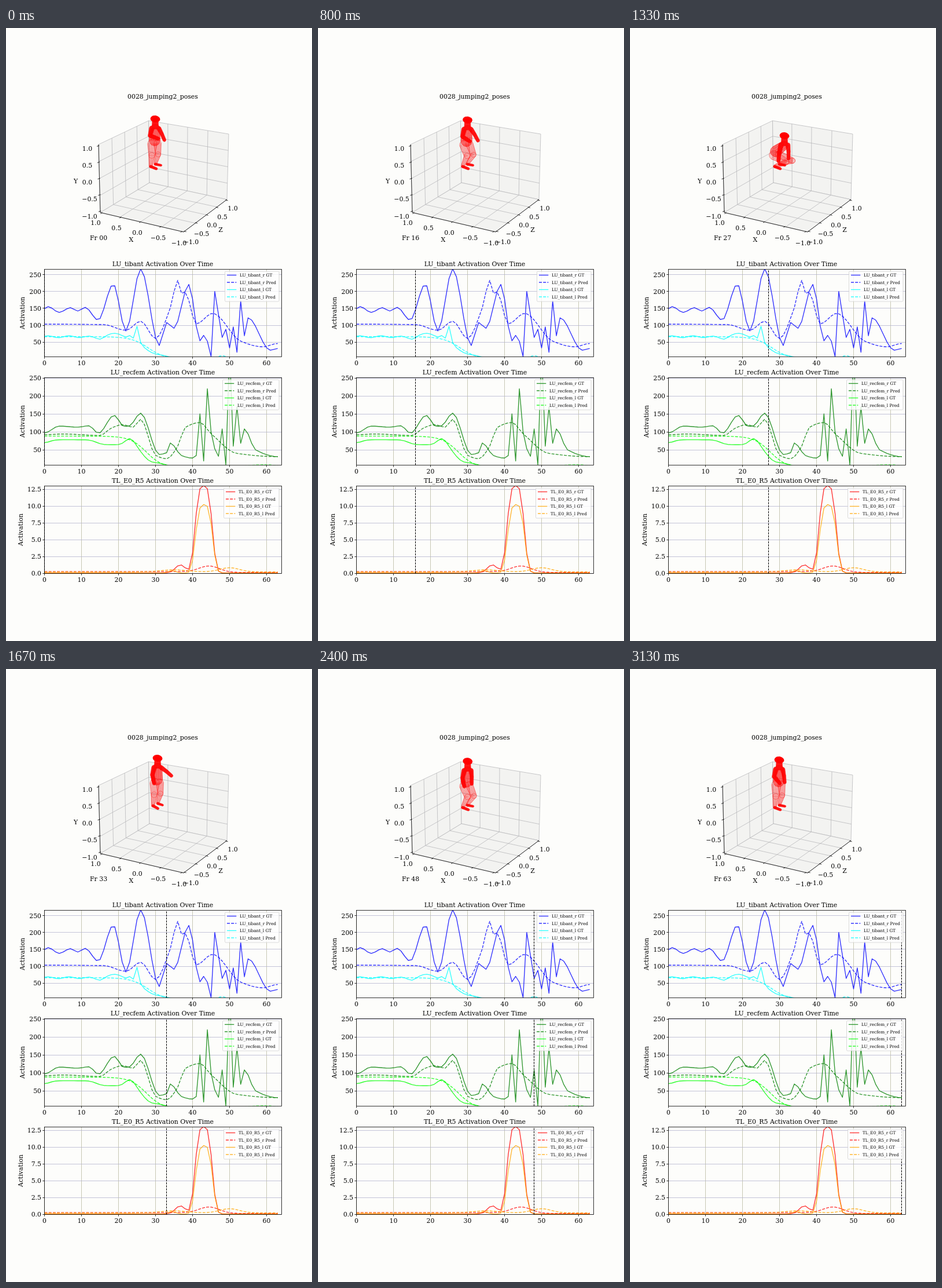
Write an HTML page that moves like this. It is 529 px wide and 1058 px high and loops after 3200 ms.

```html
<!DOCTYPE html>
<html lang="en">
<head>
<meta charset="utf-8">
<title>Activation plots</title>
<style>
  html, body { margin: 0; width: 100%; height: 100%; overflow: hidden; background: #fdfdfb; }
  svg { display: block; width: 529px; height: 1058px; }
  text { font: 10.9px "DejaVu Serif", "Noto Serif", serif; fill: #000; }
  .legend text { font-size: 7.3px; }
  .mid { text-anchor: middle; }
  .end { text-anchor: end; }
  .grid { stroke: #b6b6b8; stroke-width: .75; }
  .row { stroke: #b2b2cc; }
  .column { stroke: #b6b69e; }
  .axis { stroke: #000; stroke-width: .8; fill: none; }
  .curve { fill: none; stroke-width: 1.36; stroke-opacity: .8; stroke-linejoin: round; }
  .dash { stroke-dasharray: 5 2.2; }
  .cursor { stroke: #000; stroke-width: 1; stroke-dasharray: 3.6 1.6; }
</style>
</head>
<body>
<svg id="stage" viewBox="0 0 529 1058"></svg>
<script>
const stage = document.getElementById('stage');
function add(parent, tag, attrs, text) {
  const node = document.createElementNS('http://www.w3.org/2000/svg', tag);
  for (const key in attrs) node.setAttribute(key, attrs[key]);
  if (text !== undefined) node.textContent = text;
  return parent.appendChild(node);
}
const label = (x, y, text, cls = 'mid') => add(stage, 'text', { x, y, class: cls }, text);
const line = (x1, y1, x2, y2, cls) => add(stage, 'line', { x1, y1, x2, y2, class: cls });
const snap = v => Math.floor(v) + .5;
const num = v => v.toFixed(1);

// ---- Curves ----
const bump = (x, center, height, width, power = 2) => height * Math.exp(-((Math.abs(x - center) / width) ** power));
const fall = (x, height, middle, width) => height / (1 + Math.exp((x - middle) / width));

// Monotone spline: flat at peaks and dips, smooth on slopes.
function spline(...points) {
  const rise = points.slice(1).map((p, i) => (p[1] - points[i][1]) / (p[0] - points[i][0]));
  const slope = points.map((_, i) => {
    const a = rise[i - 1], b = rise[i];
    return a * b > 0 ? 2 * a * b / (a + b) : 0;
  });
  return x => {
    const i = Math.max(1, points.findIndex(p => p[0] >= x));
    const [x0, y0] = points[i - 1], [x1, y1] = points[i];
    const h = x1 - x0, f = (x - x0) / h, ease = f * f * (3 - 2 * f);
    return y0 + (y1 - y0) * ease + h * f * (1 - f) * (slope[i - 1] * (1 - f) - slope[i] * f);
  };
}

const tibant = [
  spline([0, 149], [1, 155], [4, 138], [7, 152], [9, 142], [11, 153], [14.5, 115], [18.6, 222], [22, 83],
    [26, 267], [31, 40], [33, 108], [35, 91], [39, 221], [42, 54], [43.4, 74], [45, 7], [46, 200], [48, 64],
    [49, 88], [50, 33], [51, 95], [52, 20], [53, 172], [54, 69], [55, 122], [61, 26], [63, 31]),
  spline([0, 103], [16, 102], [22, 85], [26, 112], [30, 61], [34, 152], [36, 233], [37, 195], [38, 198],
    [41, 104], [45.4, 135], [53, 53], [59, 36], [63, 46]),
  x => fall(x, 66, 27, 1.8) + 3 * Math.cos(x * 1.1 - 1) * fall(x, 1, 13, 1) + bump(x, 15, -8, 1.4)
    + bump(x, 19, 11, 2.5) + bump(x, 23, 9, .5) + bump(x, 25, 47, .7) + bump(x, 32, 7, 3),
  x => fall(x, 66, 28, 2.3) + bump(x, 48, 10, 2)
];
const recfem = [
  spline([0, 97], [4, 116], [9, 113], [12, 117], [14.6, 96], [18.8, 146], [21.5, 115], [23, 117], [26, 152],
    [31, 37], [33, 42], [34, 69], [37, 34], [40, 27], [41, 34], [42, 150], [43, 19], [44, 220], [45, 100],
    [47, 32], [48, 108], [49, 8], [50, 330], [51, 60], [52, 170], [53, 68], [54, 108], [57, 50], [63, 31]),
  spline([0, 92], [5, 94], [15, 90], [18, 110], [21, 120], [24, 113], [26, 135], [30, 35], [33, 25], [36, 60],
    [38, 112], [42, 126], [45, 95], [52, 40], [63, 31]),
  x => fall(x, 64, 26.8, 1.2) + fall(x, 14, 14, .8) + bump(x, 0, -8, 2) + bump(x, 23.2, 20, 1.8) + bump(x, 31, 11, 3.2),
  x => fall(x, 88, 27.5, 2.2) + bump(x, 59, 8, 8)
];
const trunk = [
  x => .05 + bump(x, 43, 13, 2.66, 3.35) + bump(x, 36.7, 1.2, 1.9),
  x => .1 + fall(x, .15, 48, 2) + bump(x, 44.5, .85, 3.7),
  x => .02 + bump(x, 43.1, 10.2, 2.66, 3.35) + bump(x, 34.5, .35, 1.5),
  x => .2 + bump(x, 35, .3, 5) + bump(x, 50, .62, 3.7)
];

const LEFT = 66.5, RIGHT = 476.5, HEIGHT = 151;
const xAt = v => LEFT + 6.4 * v;
const charts = [
  { name: 'LU_tibant', top: 416.5, zero: 571.3, unit: .583, step: 50, ticks: [1, 5], digits: 0,
    legendX: 404, labelX: 32, colors: ['#00f', '#0ff'], curves: tibant },
  { name: 'LU_recfem', top: 603.5, zero: 759, unit: .62, step: 50, ticks: [1, 5], digits: 0,
    legendX: 400, labelX: 32, colors: ['#008000', '#0f0'], curves: recfem },
  { name: 'TL_E0_R5', top: 790.5, zero: 941, unit: 11.6, step: 2.5, ticks: [0, 5], digits: 1,
    legendX: 402, labelX: 29, colors: ['#f00', '#ffa500'], curves: trunk }
];

function drawChart(chart, index) {
  const { top, name, legendX } = chart, bottom = top + HEIGHT;
  const yAt = v => chart.zero - chart.unit * v;
  const box = { x: LEFT, y: top, width: RIGHT - LEFT, height: HEIGHT };
  add(add(stage, 'clipPath', { id: 'clip' + index }), 'rect', box);
  for (let v = 0; v <= 60; v += 10) {
    const x = snap(xAt(v));
    line(x, top, x, bottom, 'grid column');
    line(x, bottom, x, bottom + 3.2, 'axis');
    label(xAt(v), bottom + 14.5, v);
  }
  for (let k = chart.ticks[0]; k <= chart.ticks[1]; k++) {
    const v = k * chart.step, y = snap(yAt(v));
    line(LEFT, y, RIGHT, y, 'grid row');
    line(LEFT - 3.2, y, LEFT, y, 'axis');
    label(61, Math.round(yAt(v) + 4), v.toFixed(chart.digits), 'end');
  }
  const plot = add(stage, 'g', { 'clip-path': `url(#clip${index})` });
  const style = i => ({ class: i % 2 ? 'curve dash' : 'curve', stroke: chart.colors[i >> 1] });
  chart.curves.forEach((curve, i) => {
    const points = Array.from({ length: 64 }, (_, x) => num(xAt(x)) + ' ' + num(yAt(curve(x))));
    add(plot, 'path', { d: 'M' + points.join('L'), ...style(i) });
  });
  chart.cursor = line(0, bottom, 0, top, 'cursor');
  add(stage, 'rect', { ...box, class: 'axis' });

  const legend = add(stage, 'g', { class: 'legend' });
  add(legend, 'rect', { x: legendX - 25.5, y: top + 3.5, width: 497.5 - legendX, height: 52, rx: 1.6,
    fill: '#fff', 'fill-opacity': .8, stroke: '#ccc', 'stroke-opacity': .8, 'stroke-width': .9 });
  ['r GT', 'r Pred', 'l GT', 'l Pred'].forEach((suffix, i) => {
    const y = top + 10 + 12.5 * i;
    add(legend, 'path', { d: `M${legendX - 22} ${y}h16.3`, ...style(i) });
    add(legend, 'text', { x: legendX, y: y + 2.8 }, name + '_' + suffix);
  });
  label(271, top - 5.5, name + ' Activation Over Time');
  add(stage, 'text', { class: 'mid', transform: `translate(${chart.labelX} ${top + HEIGHT / 2}) rotate(-90)` }, 'Activation');
}

// ---- 3D box: corners are x, y and a perspective weight ----
const leftTop = [160, 201, 1], leftLow = [163, 318.5, 1], backTop = [246.5, 160, 1.09], backLow = [248, 267, 1.09];
const rightTop = [385, 183, 1.035], rightLow = [382, 296, 1.035], front = [307, 352, .93];
function between(p, q, f) {
  const w = p[2] * (1 - f) + q[2] * f;
  return [0, 1].map(i => (p[i] * p[2] * (1 - f) + q[i] * q[2] * f) / w);
}

function drawBox() {
  const panes = [
    [leftTop, backTop, backLow, leftLow],
    [backTop, rightTop, rightLow, backLow],
    [leftLow, backLow, rightLow, front]
  ];
  for (const pane of panes) {
    add(stage, 'polygon', { points: pane.map(p => p.slice(0, 2)).join(' '), fill: '#f3f3f1', class: 'grid' });
  }
  for (const [a, b, c, d] of panes) for (const f of [.25, .5, .75]) {
    line(...between(a, b, f), ...between(d, c, f), 'grid');
    line(...between(a, d, f), ...between(b, c, f), 'grid');
  }
  const axes = [[leftTop, leftLow, -3, 1], [leftLow, front, -2.2, 1.5], [front, rightLow, 3, .9]];
  for (const [p, q, dx, dy] of axes) {
    line(p[0], p[1], q[0], q[1], 'axis');
    for (let k = 0; k < 5; k++) {
      const [x, y] = between(p, q, .02 + .24 * k);
      line(x - dx * .4, y - dy * .4, x + dx, y + dy, 'axis');
    }
  }
  ['1.0', '0.5', '0.0', '−0.5', '−1.0'].forEach((text, k) => {
    label(k < 3 ? 140.5 : 144.5, 211.5 + 29.3 * k, text);
    label(155 + 36 * k, 340 + 8.7 * k, text);
    label(392 - 18 * k, 315 + 14.5 * k, text);
  });
  label(120.5, 267.5, 'Y');
  label(216.5, 369, 'X');
  label(371, 352, 'Z');
  label(271, 122, '0028_jumping2_poses');
}

// ---- Figure ----
// Pose, knee bend, height off the ground, near forearm angle, far arm angle.
const jump = [
  [0, 0, 0, 1.2, .5], [11, 0, 0, 1.2, .5], [16, .06, 0, 1, .6], [26, 1, 0, -.1, .1], [28, 1, 0, -.1, .1],
  [33, 0, 3, .2, .95], [37, 0, 17, .2, .5], [41, .03, 8, .25, .4], [44, .25, 0, .3, 0], [48, .08, 0, .2, .1],
  [58, 0, 0, .7, .2], [63, 0, 0, .7, .2]
];
function motionAt(pose) {
  const next = Math.max(1, jump.findIndex(key => key[0] >= pose));
  const from = jump[next - 1], to = jump[next];
  const f = (pose - from[0]) / (to[0] - from[0]), ease = f * f * (3 - 2 * f);
  return from.map((v, i) => v + (to[i] - v) * ease).slice(1);
}

// A tapered limb: its outline and a net of lines over it.
function limb(a, b, ra, rb) {
  const dx = b[0] - a[0], dy = b[1] - a[1], len = Math.hypot(dx, dy) || 1;
  const at = (f, side) => {
    const r = (ra + (rb - ra) * f) * side / len;
    return num(a[0] + dx * f - dy * r) + ' ' + num(a[1] + dy * f + dx * r);
  };
  const outline = `M${at(0, 1)}L${at(1, 1)}A${rb} ${rb} 0 0 0 ${at(1, -1)}L${at(0, -1)}A${ra} ${ra} 0 0 0 ${at(0, 1)}Z`;
  let net = '';
  for (let s = -1; s <= 1.01; s += .4) net += `M${at(0, s)}L${at(1, s)}`;
  const rungs = Math.ceil(len / 2.6);
  for (let i = 0; i <= rungs; i++) net += `M${at(i / rungs, -1)}L${at(i / rungs, 1)}`;
  return { outline, net };
}

drawBox();
const figure = add(stage, 'g', { fill: '#f00', stroke: '#f00' });
const layer = (fill, net) => ({
  body: add(figure, 'path', { 'fill-opacity': fill, 'stroke-width': .5, 'stroke-opacity': .75 }),
  net: add(figure, 'path', { fill: 'none', 'stroke-width': .5, 'stroke-opacity': net })
});
const legs = layer(.18, .5), torso = layer(.5, .7), solid = layer(.88, .5);
const head = add(figure, 'ellipse', { rx: 8.4, ry: 6, stroke: 'none' });
const poseLabel = label(145, 366, 'Fr 00', '');
charts.forEach(drawChart);

function fillLayer(target, limbs) {
  const parts = limbs.map(args => limb(...args));
  target.body.setAttribute('d', parts.map(p => p.outline).join(''));
  target.net.setAttribute('d', parts.map(p => p.net).join(''));
}

function drawFigure(pose) {
  const [bend, lift, fold, swing] = motionAt(pose);
  const drift = 4 * Math.min(1, lift / 3);
  const off = (p, dx, dy) => [p[0] + dx, p[1] + dy];
  const reach = (p, length, angle) => off(p, length * Math.sin(angle), length * Math.cos(angle));
  const neck = [258 + drift + 9 * bend, 167 - lift + 29 * bend];
  const hip = [257 + drift - 5 * bend, 197 - lift + 19 * bend];
  const nearKnee = [252 + drift + 18 * bend ** .4, 220 - lift + 11 * bend];
  const farKnee = off(nearKnee, 11, -2);
  const nearAnkle = [250 + drift, 239 - lift], farAnkle = off(nearAnkle, 8, -4);
  const droop = Math.min(3, lift / 3);
  const nearElbow = reach(off(neck, -6, 6), 13, -.22), farElbow = reach(off(neck, 6, 6), 11, swing);

  fillLayer(legs, [
    [off(hip, 5, 2), farKnee, 6.2, 4.5], [farKnee, farAnkle, 4.5, 2.3],
    [off(hip, -4, 3), nearKnee, 8, 5], [nearKnee, nearAnkle, 5, 2.6]
  ]);
  fillLayer(torso, [[off(neck, 0, 6), off(hip, 0, -3), 7.5, 9.5]]);
  fillLayer(solid, [
    [off(neck, 6, 6), farElbow, 3.8, 3], [farElbow, reach(farElbow, 12, swing - .1), 3, 2.8],
    [off(neck, -6, 6), nearElbow, 4.2, 3.4], [nearElbow, reach(nearElbow, 15, fold), 3.4, 3],
    [off(neck, 0, -8), off(neck, 0, 2), 5, 5.5],
    [farAnkle, off(farAnkle, 10 - droop, 2 + droop), 2, 1.7],
    [nearAnkle, off(nearAnkle, 10 - droop, 4 + droop), 2.3, 2]
  ]);
  head.setAttribute('transform', `translate(${num(neck[0])} ${num(neck[1] - 10)}) rotate(8)`);
}

// 48 steps per loop, spread over 64 poses.
const LOOP = 3200, STEPS = 48;
let shown = -1;
function render(t) {
  const step = Math.min(STEPS - 1, Math.floor((t % LOOP + 5) * STEPS / LOOP));
  if (step === shown) return;
  shown = step;
  const pose = Math.round(step * 4 / 3), x = snap(xAt(pose));
  drawFigure(pose);
  poseLabel.textContent = 'Fr ' + String(pose).padStart(2, '0');
  for (const { cursor } of charts) {
    cursor.setAttribute('x1', x);
    cursor.setAttribute('x2', x);
  }
}
const start = performance.now();
function tick() {
  render(performance.now() - start);
  requestAnimationFrame(tick);
}
tick();
</script>
</body>
</html>
```
